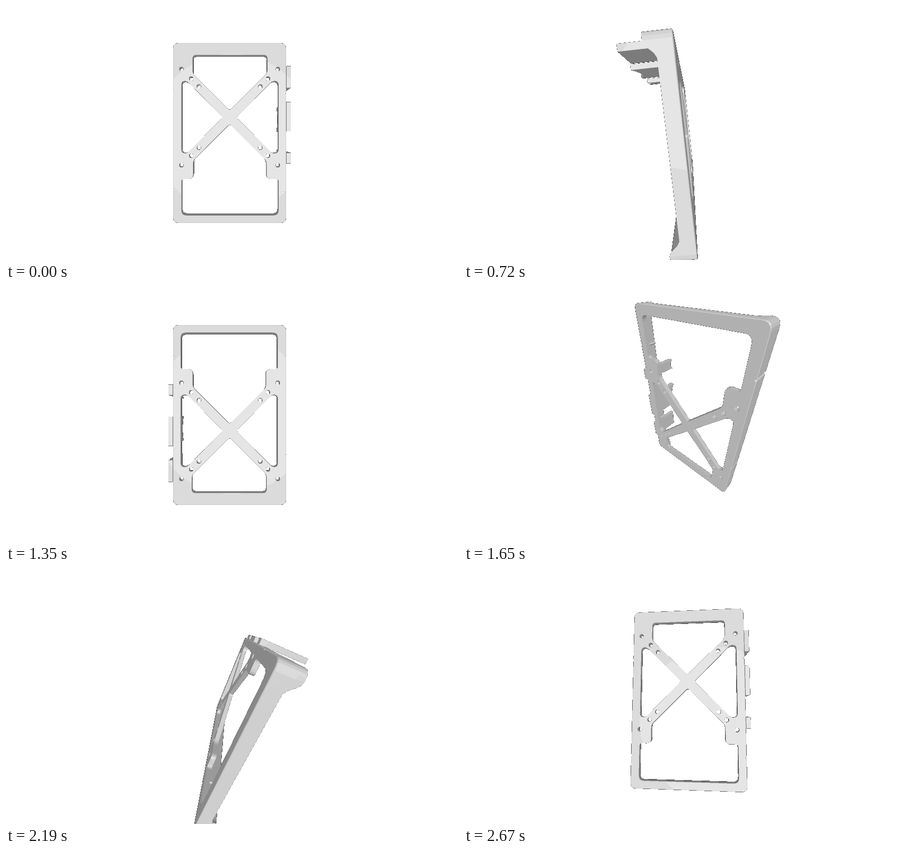
An HTML page with a canvas for the animation above (2.7 s loop, 852 by 480 pixels).

```html
<!DOCTYPE html>
<html>
<head>
<meta charset="utf-8">
<style>
html, body { margin: 0; width: 100%; height: 100%; overflow: hidden; background: #fff; }
canvas { display: block; }
</style>
</head>
<body>
<canvas id="stage" width="852" height="480"></canvas>
<script>
const W = 852, H = 480, STEP = 30, STEPS = 90;
const SS = 2, SW = W * SS, SH = H * SS;            // supersampled size
const CX = W / 2, CY = H / 2, FOCAL = 312.8 * SS;
const PIVOT_X = -4.5;                              // the part turns left of the optical axis
const FRONT = 1, PLATE_BACK = -6.7, DIST = 312.8 + FRONT;
const HALF_W = 106.7, HALF_H = 170.3;

const ctx = document.getElementById('stage').getContext('2d');
const image = ctx.createImageData(W, H);
const pixels = new Uint32Array(image.data.buffer);
const depth = new Float32Array(SW * SH);
const shade = new Uint8Array(SW * SH);

// ---------- model ----------
const faces = [];

const sub = (a, b) => a.map((v, i) => v - b[i]);
const dot = (a, b) => a[0] * b[0] + a[1] * b[1] + a[2] * b[2];
const unit = v => v.map(k => k / (Math.hypot(...v) || 1));
const cross = (a, b) => [
  a[1] * b[2] - a[2] * b[1],
  a[2] * b[0] - a[0] * b[2],
  a[0] * b[1] - a[1] * b[0]
];

// Corners are [x, y, cut]; a corner with a cut is replaced by a curve.
function rounded(corners) {
  const out = [];
  corners.forEach(([x, y, cut], i) => {
    if (!cut) return out.push([x, y]);
    const toward = j => {
      const q = corners[(j + corners.length) % corners.length];
      const k = cut / Math.hypot(q[0] - x, q[1] - y);
      return [x + (q[0] - x) * k, y + (q[1] - y) * k];
    };
    const a = toward(i - 1), b = toward(i + 1);
    for (let k = 0; k <= 5; k++) {
      const t = k / 5, u = 1 - t;
      out.push([0, 1].map(d => u * u * a[d] + 2 * u * t * [x, y][d] + t * t * b[d]));
    }
  });
  return out;
}

function oriented(points, ccw) {
  const area = points.reduce((sum, p, i) => {
    const q = points[(i + 1) % points.length];
    return sum + p[0] * q[1] - q[0] * p[1];
  }, 0);
  return (area > 0) === ccw ? points : points.reverse();
}

function loft(top, bottom) {
  top.forEach((a, i) => {
    const j = (i + 1) % top.length, b = top[j];
    const normal = unit(cross(sub(b, a), sub(a, bottom[i])));
    faces.push({ loops: [[a, b, bottom[j], bottom[i]]], normal });
  });
}

const atZ = (points, z) => points.map(([x, y]) => [x, y, z]);
const inset = (points, d) => points.map(([x, y]) => [x * (1 - d / HALF_W), y * (1 - d / HALF_H)]);

// The rim is deeper at the long sides, with a smooth step along the short ends.
function rimBack([x]) {
  const t = Math.min(1, Math.max(0, (Math.abs(x) - 82) / 14));
  return -14 - 10.7 * t * t * (3 - 2 * t);
}

function buildPlate() {
  const endXs = [96, 93.5, 91, 88.5, 86, 82];
  const endRow = [...endXs, ...endXs.map(x => -x).reverse()];
  const notch = (side, y) => [[side * HALF_W, y + side * -2.2], [side * (HALF_W - 2), y], [side * HALF_W, y + side * 2.2]];
  const outline = oriented(rounded([
    [HALF_W, -HALF_H, 10], ...notch(1, -110), ...notch(1, 73),
    [HALF_W, HALF_H, 10], ...endRow.map(x => [x, HALF_H]),
    [-HALF_W, HALF_H, 10], ...notch(-1, 73), ...notch(-1, -110),
    [-HALF_W, -HALF_H, 10], ...endRow.map(x => [-x, -HALF_H])
  ]), true);

  const windows = [
    [[351.5, 92.5, 7], [493, 92.5, 7], [493, 126, 6], [421.5, 197, 4], [351.5, 127.5, 6]],
    [[330.3, 141.5, 8], [341, 141.5, 5], [408.5, 210, 4], [341, 278.5, 5], [330.3, 278.5, 8]],
    [[514, 141.5, 8], [502, 141.5, 5], [434.5, 210, 4], [502, 278.5, 5], [514, 278.5, 8]],
    [[421.5, 223, 4], [491.5, 293, 6], [491.5, 327, 8], [514, 327, 5], [514, 395.8, 10],
     [330.5, 395.8, 10], [330.5, 327, 5], [352.5, 327, 8], [352.5, 292, 6]]
  ].map(w => rounded(w.map(([x, y, cut]) => [x - CX - PIVOT_X, CY - y, cut])));

  const drills = [];
  for (const side of [-1, 1]) {
    for (const [x, y] of [[91, 121], [72.5, 103], [58, 88], [58, -28], [72.5, -43], [91, -61]]) {
      drills.push(Array.from({ length: 14 }, (_, i) => {
        const a = i * Math.PI / 7;
        return [side * x + 4.3 * Math.cos(a), y + 4.3 * Math.sin(a)];
      }));
    }
  }

  const holes = [...windows, ...drills].map(h => oriented(h, false));
  const face = atZ(inset(outline, 0.7), FRONT);
  const edge = atZ(outline, FRONT - 0.7);
  faces.push({ loops: [face, ...holes.map(h => atZ(h, FRONT))], normal: [0, 0, 1] });
  loft(face, edge);
  loft(edge, outline.map(p => [...p, rimBack(p)]));
  holes.forEach(h => loft(atZ(h, FRONT), atZ(h, PLATE_BACK)));

  const inner = inset(outline, 6);
  loft(atZ(inner, PLATE_BACK).reverse(),
       inner.map((p, i) => [...p, rimBack(outline[i])]).reverse());
}

function buildClip(high, low, back, bow) {
  const profile = [[high, -0.5], [low, -0.5]];
  for (let i = 0; i <= 8; i++) {
    const t = i / 8;
    profile.push([low + (high - low) * t, back + bow * 4 * t * (1 - t)]);
  }
  const atX = x => profile.map(([y, z]) => [x, y, z]);
  const outside = atX(116), inside = atX(107.8);
  loft(outside, inside);
  faces.push({ loops: [outside], normal: [1, 0, 0] }, { loops: [inside], normal: [-1, 0, 0] });
}

buildPlate();
buildClip(127, 86, -62, 0);
buildClip(59, 3, -72, 8);
buildClip(-38, -58, -72, 5);

// ---------- rendering ----------
function tone(value) {
  if (value >= 221) return 229;
  return value >= 213 ? 219 : Math.round(value);
}

function fillFace(loops, n, offset) {
  const edges = [];
  let top = SH, bottom = 0;
  for (const loop of loops) {
    const pts = loop.map(([x, y, z]) => [CX * SS - FOCAL * x / z, CY * SS + FOCAL * y / z]);
    pts.forEach((a, i) => {
      const b = pts[(i + 1) % pts.length];
      top = Math.min(top, a[1]);
      bottom = Math.max(bottom, a[1]);
      if (a[1] !== b[1]) edges.push(a[1] < b[1] ? [a, b] : [b, a]);
    });
  }
  const base = 123 + 90 * Math.max(0, n[2]);
  const shiny = n[2] > 0.75;
  const flat = tone(base);
  const slope = n[0] / FOCAL / offset;

  for (let y = Math.max(0, Math.floor(top)); y < Math.min(SH, bottom); y++) {
    const mid = y + 0.5, xs = [];
    for (const [a, b] of edges) {
      if (a[1] <= mid && b[1] > mid) xs.push(a[0] + (b[0] - a[0]) * (mid - a[1]) / (b[1] - a[1]));
    }
    xs.sort((p, q) => p - q);
    const ry = (CY * SS - mid) / FOCAL;
    for (let k = 0; k + 1 < xs.length; k += 2) {
      const from = Math.max(0, Math.ceil(xs[k] - 0.5));
      const to = Math.min(SW, Math.ceil(xs[k + 1] - 0.5));
      let rx = (from + 0.5 - CX * SS) / FOCAL;
      let near = (n[0] * rx + n[1] * ry - n[2]) / offset;
      for (let x = from, at = y * SW + from; x < to; x++, at++) {
        if (near > depth[at]) {
          depth[at] = near;
          if (shiny) {
            const len = Math.sqrt(rx * rx + ry * ry + 1);
            const facing = (n[2] - n[0] * rx - n[1] * ry) / len;
            const half = (facing + n[2]) / Math.sqrt(2 + 2 / len);
            shade[at] = tone(base + 17 * Math.pow(Math.max(0, half), 30));
          } else shade[at] = flat;
        }
        near += slope;
        rx += 1 / FOCAL;
      }
    }
  }
}

// Edge samples blend toward black, and pixels less than half covered stay white.
function resolve() {
  for (let y = 0; y < H; y++) {
    for (let x = 0; x < W; x++) {
      let sum = 0, hits = 0;
      const at = y * SS * SW + x * SS;
      for (const i of [at, at + 1, at + SW, at + SW + 1]) {
        if (depth[i] > 0) { sum += shade[i]; hits++; }
      }
      const v = hits >= 2 ? sum >> 2 : 255;
      pixels[y * W + x] = 0xff000000 | v * 0x10101;
    }
  }
}

function render(angle) {
  const c = Math.cos(angle), s = Math.sin(angle);
  const turn = ([x, y, z]) => {
    const q = z * c - x * s;
    return [x * c + z * s, y * c - q * s, y * s + q * c];
  };
  const toView = p => {
    const [x, y, z] = turn(p);
    return [x + PIVOT_X, y, z - DIST];
  };
  depth.fill(0);
  for (const { loops, normal } of faces) {
    const n = turn(normal);
    const offset = dot(n, toView(loops[0][0]));
    if (offset < -1e-6) fillFace(loops.map(l => l.map(toView)), n, offset);
  }
  resolve();
  ctx.putImageData(image, 0, 0);
}

const start = performance.now();
let shown = -1;
function tick() {
  const step = Math.floor((performance.now() - start) / STEP) % STEPS;
  if (step !== shown) {
    shown = step;
    render(step / STEPS * 2 * Math.PI);
  }
  requestAnimationFrame(tick);
}
tick();
</script>
</body>
</html>
```
